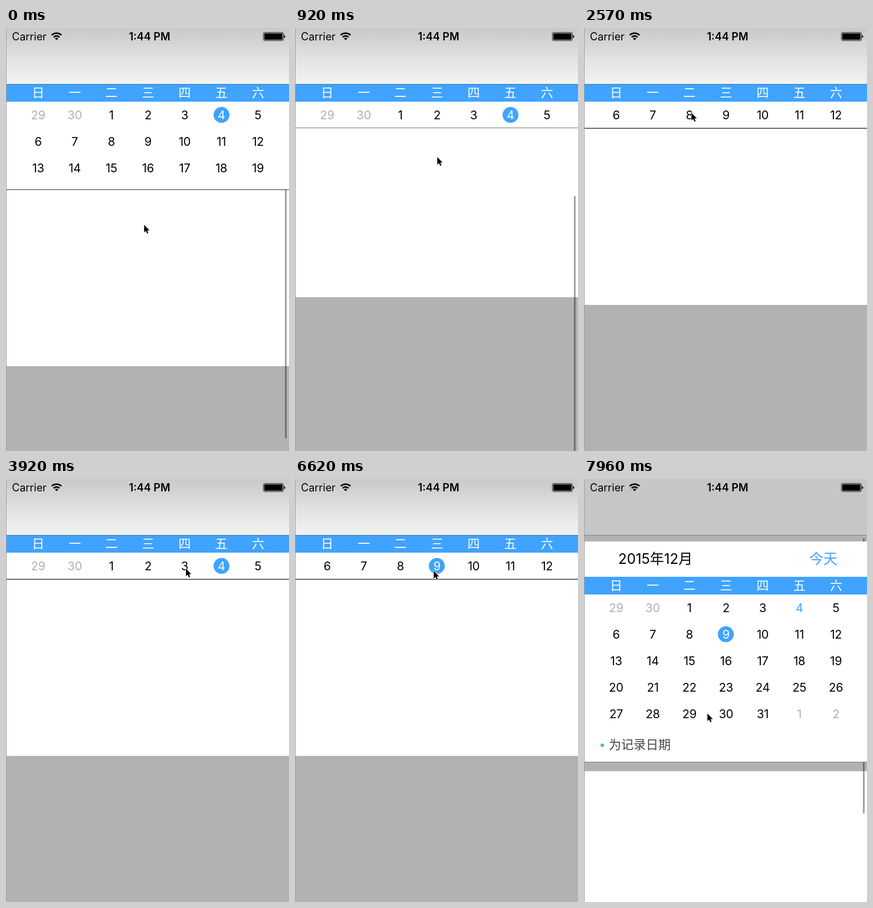
These frames come from a looping animation (480x718 px, 8000 ms). An HTML page:

```html
<!DOCTYPE html>
<html lang="zh">
<head>
<meta charset="utf-8">
<title>Calendar</title>
<style>
  html, body { margin: 0; width: 100%; height: 100%; overflow: hidden; }
  body { font: 20px Inter, "Noto Sans CJK SC", "Noto Sans CJK", sans-serif; color: #000; }
  div, svg, span { position: absolute; }
  #stage { left: 0; top: 0; width: 480px; height: 718px; overflow: hidden; background: #b2b2b2; }
  #sheet { left: 0; width: 480px; height: 300px; background: #fff; }
  #bar { left: 473px; width: 3px; border-radius: 1.5px; background: rgba(0, 0, 0, .36); }
  #cal { left: 0; width: 480px; background: #fff; overflow: hidden; }
  .title { top: 0; line-height: 59px; font-size: 24px; white-space: nowrap; }
  #month { left: 58px; }
  #today { left: 382px; color: #40a3ff; }
  #days { top: 60px; width: 480px; height: 30px; background: #40a3ff; color: #fff; }
  #days span { width: 60px; line-height: 30px; text-align: center; font-size: 21px; font-weight: 500; }
  #rows { top: 90px; width: 480px; bottom: 0; overflow: hidden; }
  .row { left: 0; top: 0; width: 480px; height: 45px; }
  .row span {
    top: 9px; width: 27px; height: 27px; line-height: 28px; border-radius: 50%;
    display: flex; justify-content: center; letter-spacing: -.2px;
  }
  .row .dim { color: #b0b0b0; }
  .row .now { color: #40a3ff; }
  .row .on { color: #fff; background: #40a3ff; }
  #note { left: 42px; top: 240px; line-height: 30px; font-size: 21px; color: #444; white-space: nowrap; }
  #dot { left: 28px; top: 253px; width: 6px; height: 6px; border-radius: 50%; background: #3fcaa6; }
  #line { left: 0; width: 480px; height: 1px; }
  #nav {
    left: 0; top: 0; width: 480px; height: 95px; border-bottom: 1px solid rgba(80, 80, 80, .5);
    background: linear-gradient(#c9c9c9, #d5d5d5 28%, #e3e4e4 58%, #f1f3f2) padding-box;
  }
  #shade { width: 480px; height: 95px; background: #c6c6c6; }
  .status { top: 0; line-height: 29px; font-size: 18px; white-space: nowrap; }
  #clock { left: 0; width: 487px; text-align: center; font-weight: 600; }
  #icons, #cursor { left: 0; top: 0; overflow: visible; }
  #edge { left: 0; top: 0; width: 1px; height: 718px; background: #a0a0a0; }
</style>
</head>
<body>
<div id="stage">
  <div id="sheet"></div>
  <div id="bar"></div>
  <div id="cal">
    <span id="month" class="title">2015年12月</span>
    <span id="today" class="title">今天</span>
    <div id="days"></div>
    <div id="rows">
      <div id="dot"></div>
      <span id="note">为记录日期</span>
    </div>
  </div>
  <div id="line"></div>
  <div id="nav">
    <div id="shade"></div>
    <span class="status" style="left:10px">Carrier</span>
    <span id="clock" class="status">1:44 PM</span>
    <svg id="icons" width="480" height="30">
      <g fill="none" stroke="#000" stroke-width="2.5">
        <path d="M77.5 12.2a12 12 0 0 1 16.6 0"/>
        <path d="M80.8 15.6a7.2 7.2 0 0 1 10 0"/>
      </g>
      <path d="M85.8 20.8l-2.8-3a4 4 0 0 1 5.6 0z"/>
      <rect x="436.5" y="7.5" width="34" height="14" rx="2.5" fill="none" stroke="#222"/>
      <rect x="438" y="9" width="31" height="11" rx="1"/>
      <path d="M471.5 12q2 0 2 2.5t-2 2.5z"/>
    </svg>
  </div>
  <div id="edge"></div>
  <svg id="cursor" width="12" height="18">
    <path d="M.3 1V14L3.2 11.2 5.3 16 7.4 15.1 5.4 10.4H9.4Z" stroke="#fff" stroke-width="1.6"
      paint-order="stroke" stroke-linejoin="round"/>
  </svg>
</div>
<script>
const $ = id => document.getElementById(id);
const LOOP = 8000, WIDTH = 480, COL = 62.15, ROW = 45;
const OPEN = 470, PINNED = 409, FOLDED = 170;
const TODAY = 5;

const clamp = v => Math.max(0, Math.min(1, v));

function ease(t, from, to) {
  const u = clamp((t - from) / (to - from));
  return u * u * (3 - 2 * u);
}

function addCell(parent, text, col, width) {
  const el = document.createElement('span');
  el.textContent = text;
  el.style.left = 54.5 + col * COL - width / 2 + 'px';
  parent.append(el);
  return el;
}

[...'日一二三四五六'].forEach((d, i) => addCell($('days'), d, i, 60));

const rows = [], cells = [];
for (let r = 0; r < 5; r++) {
  const row = document.createElement('div');
  row.className = 'row';
  $('rows').append(row);
  rows.push(row);
  for (let c = 0; c < 7; c++) {
    const n = r * 7 + c - 1;
    cells.push(addCell(row, n < 1 ? n + 30 : n > 31 ? n - 31 : n, c, 27));
  }
}

function cellClass(i, picked) {
  if (i === picked) return 'on';
  if (i === TODAY) return 'now';
  return i < 2 || i > 32 ? 'dim' : '';
}

function step(t) {
  if (t < 170) return 0;
  const start = t < 7660 ? 170 : 160;
  return start + Math.floor((t - start) / 150) * 150;
}

// Lower edge of the calendar: drag up, spring back, pull down
const edgeAt = t => Math.round(274 - 117 * ease(t, 0, 920) + 13 * ease(t, 920, 1300)
  + 326 * ease(t, 7459, 7960));

// Week shown while folded: swipe forth, back and forth again
const pageAt = t => ease(t, 2120, 2570) - ease(t, 2720, 3170) + ease(t, 5420, 6020);

function mouseAt(t) {
  const x = 234 + 7 * ease(t, 0, 920) + 59 * ease(t, 1220, 1820) - 118 * pageAt(t)
    + 19 * ease(t, 3170, 5420) + 34 * ease(t, 6170, 6620) - 26 * ease(t, 6620, 7370);
  const y = 333 - 115 * ease(t, 0, 920) - 67 * ease(t, 1220, 1820)
    - 8 * ease(t, 2120, 2570) + 8 * ease(t, 2720, 3170) + 4 * ease(t, 5420, 6020)
    + 33 * ease(t, 6620, 7370) + 209 * ease(t, 7370, 7773);
  return [x, y];
}

function render(time) {
  const t = step(time % LOOP);
  const y = edgeAt(t);
  const page = pageAt(t);
  const over = Math.max(0, y - OPEN) * 10 / 26;
  const bottom = Math.max(FOLDED - 1, Math.min(y, OPEN) + over);
  const top = Math.max(35, 96 + Math.min(0, y - OPEN) + over);
  const picked = t < 4370 ? 5 : t < 6470 ? 4 : 10;
  const week = Math.floor(picked / 7);
  const folded = clamp((PINNED - y) / (PINNED - FOLDED));
  const weekMode = t > 1070 && t < 7520;
  const bouncing = y < FOLDED || y > OPEN;

  $('sheet').style.top = y + 'px';
  $('cal').style.top = top + 'px';
  $('cal').style.height = bottom - top + 'px';
  $('line').style.top = bottom + 'px';
  $('line').style.background = bouncing ? '#808080' : '#3c3c3c';
  $('line').style.boxShadow = y === FOLDED ? '0 -1px #aaa' : 'none';
  $('shade').style.opacity = clamp((y - 410) / 60);

  $('bar').style.top = Math.min(285, 100 + .636 * Math.max(0, OPEN - y)) + 'px';
  $('bar').style.height = 472 - over * .4 + 'px';
  $('bar').style.opacity = 1 - ease(t, 1370, 1820) + ease(t, 7370, 7520);

  rows.forEach((row, i) => {
    const swipe = weekMode && i < 2;
    const dx = swipe ? WIDTH * (i - page) : 0;
    const dy = swipe ? 0 : ROW * (i - week * folded);
    row.style.transform = `translate(${dx}px, ${dy}px)`;
  });
  cells.forEach((cell, i) => { cell.className = cellClass(i, picked); });

  const [mx, my] = mouseAt(t);
  $('cursor').style.transform = `translate(${mx}px, ${my}px)`;
}

const begin = performance.now();
function loop() {
  render(performance.now() - begin);
  requestAnimationFrame(loop);
}
loop();
</script>
</body>
</html>
```
